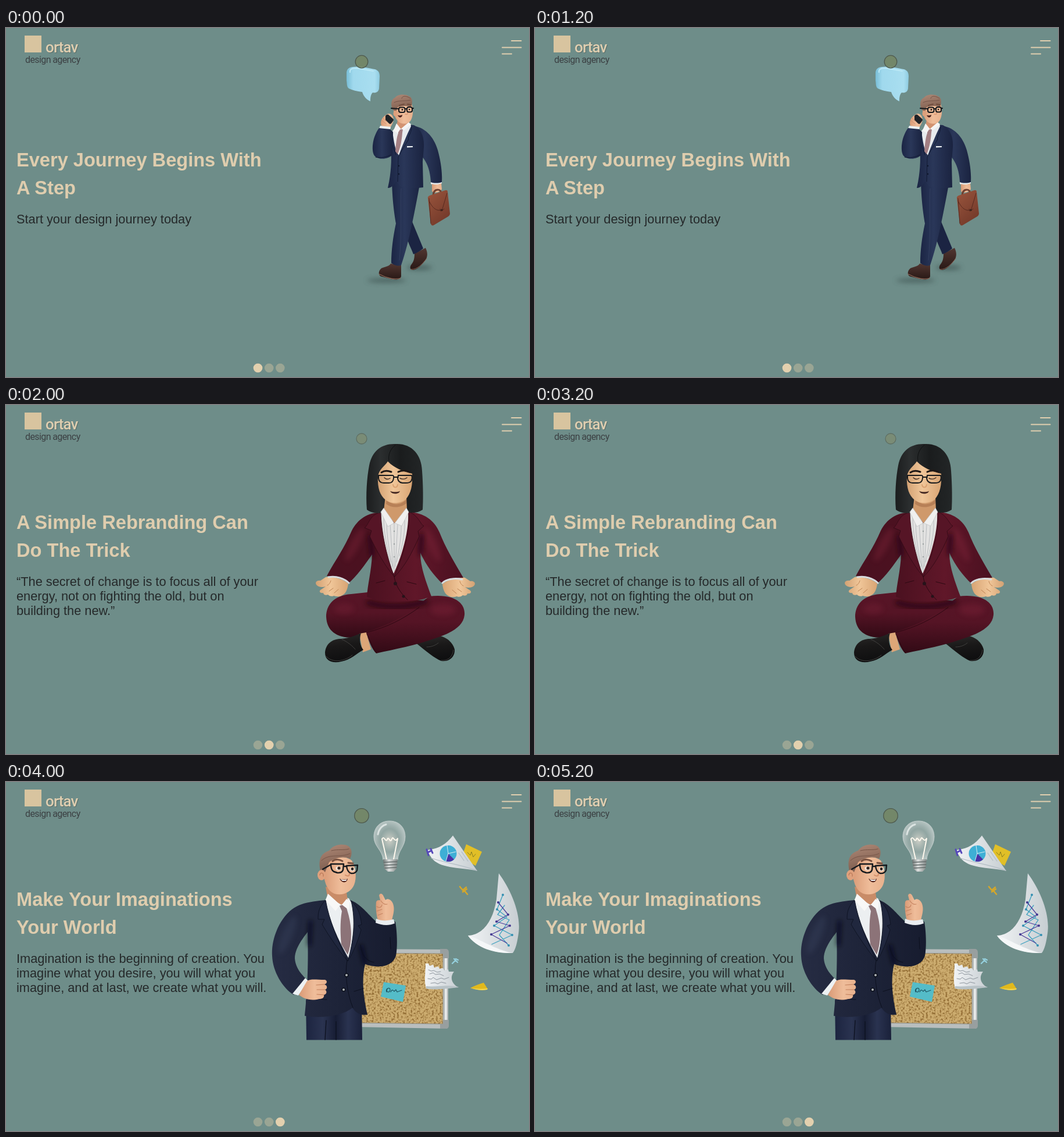
These frames come from a looping animation (900 by 600 pixels, 6000 ms). An HTML page:

```html
<!DOCTYPE html>
<html lang="en">
<head>
<meta charset="utf-8">
<title>Design agency slider</title>
<style>
html, body { margin: 0; width: 100%; height: 100%; overflow: hidden; background: #6e8d89; }
svg { display: block; width: 900px; height: 600px; }
.slide { animation: show 6s step-end infinite; }
.two { animation-delay: -4s; }
.three { animation-delay: -2s; }
@keyframes show {
  0% { visibility: visible; }
  33.333%, 100% { visibility: hidden; }
}
.h { font: bold 32.6px "Liberation Sans", Arial, sans-serif; fill: #dfcdae; }
.p { font: 21.75px "Liberation Sans", Arial, sans-serif; fill: #25292a; }
.brand { font: 500 26px Roboto, sans-serif; letter-spacing: -.9px; fill: #dfceb0; }
.tag { font: 16px Roboto, sans-serif; letter-spacing: -.6px; fill: #3c4144; }
.on { fill: #e3d0ae; }
.line { fill: none; stroke-linecap: round; stroke-linejoin: round; }
.soft { filter: url(#blur); }
.cursor { fill: #75865f; fill-opacity: .75; stroke: #4f5a4e; stroke-width: 1.3px; }
</style>
</head>
<body>
<svg viewBox="0 0 900 600">
<defs>
  <filter id="blur" x="-50%" y="-50%" width="200%" height="200%"><feGaussianBlur stdDeviation="4"/></filter>
  <filter id="cork" x="0" y="0" width="100%" height="100%" color-interpolation-filters="sRGB">
    <feTurbulence type="fractalNoise" baseFrequency=".3" numOctaves="2" seed="4"/>
    <feColorMatrix values="0 0 0 0 .55  0 0 0 0 .4  0 0 0 0 .18  3 0 0 0 -1.35"/>
    <feComposite in2="SourceGraphic" operator="in" result="n"/>
    <feMerge><feMergeNode in="SourceGraphic"/><feMergeNode in="n"/></feMerge>
  </filter>
  <linearGradient id="navy"><stop stop-color="#1b2544"/><stop offset=".45" stop-color="#2a3759"/><stop offset="1" stop-color="#1a2340"/></linearGradient>
  <linearGradient id="ink"><stop stop-color="#262c43"/><stop offset=".55" stop-color="#1d2338"/><stop offset="1" stop-color="#171c2f"/></linearGradient>
  <linearGradient id="legs"><stop stop-color="#1c2440"/><stop offset=".3" stop-color="#2a3350"/><stop offset=".53" stop-color="#171d34"/><stop offset=".75" stop-color="#2a3350"/><stop offset="1" stop-color="#1a213a"/></linearGradient>
  <linearGradient id="wine"><stop stop-color="#4a1120"/><stop offset=".3" stop-color="#4b1120"/><stop offset=".65" stop-color="#601729"/><stop offset="1" stop-color="#4a1020"/></linearGradient>
  <linearGradient id="thigh" x2="0" y2="1"><stop stop-color="#581527"/><stop offset=".45" stop-color="#551425"/><stop offset="1" stop-color="#310a15"/></linearGradient>
  <linearGradient id="skin"><stop stop-color="#d99a76"/><stop offset=".55" stop-color="#efbd9a"/><stop offset="1" stop-color="#e8b18d"/></linearGradient>
  <linearGradient id="tan"><stop stop-color="#d3a274"/><stop offset=".45" stop-color="#f0c699"/><stop offset="1" stop-color="#d8a473"/></linearGradient>
  <linearGradient id="hair" x2=".3" y2="1"><stop stop-color="#b08a78"/><stop offset="1" stop-color="#7c5c4d"/></linearGradient>
  <linearGradient id="bob"><stop stop-color="#1b1d1e"/><stop offset=".25" stop-color="#2b2e2f"/><stop offset=".6" stop-color="#1a1c1d"/><stop offset="1" stop-color="#232627"/></linearGradient>
  <linearGradient id="bubble"><stop stop-color="#78bdd6"/><stop offset=".2" stop-color="#a0d9ed"/><stop offset=".85" stop-color="#a9def0"/><stop offset="1" stop-color="#8ecbe0"/></linearGradient>
  <linearGradient id="leather" x2=".6" y2="1"><stop stop-color="#9a553d"/><stop offset="1" stop-color="#743a2a"/></linearGradient>
  <linearGradient id="shoe" x2="0" y2="1"><stop stop-color="#513631"/><stop offset="1" stop-color="#281815"/></linearGradient>
  <linearGradient id="boot" x2=".2" y2="1"><stop stop-color="#2c2b2a"/><stop offset=".5" stop-color="#191818"/><stop offset="1" stop-color="#0f0f10"/></linearGradient>
  <linearGradient id="paper"><stop stop-color="#f1f3f5"/><stop offset="1" stop-color="#c7ced2"/></linearGradient>
  <linearGradient id="metal"><stop stop-color="#6f7675"/><stop offset=".4" stop-color="#dde0df"/><stop offset="1" stop-color="#7d8483"/></linearGradient>
  <radialGradient id="glass"><stop stop-color="#efe6dc" stop-opacity=".75"/><stop offset=".6" stop-color="#b4bfbc" stop-opacity=".5"/><stop offset="1" stop-color="#d3dad9" stop-opacity=".7"/></radialGradient>
  <path id="hand" d="M550 296C560 294 580 299 589 307C588 316 585 325 577 328C571 331 566 328 564 328C560 330 556 328 554 326C550 328 546 326 546 323C541 324 538 321 541 318L550 312C544 314 537 313 534 309C531 304 536 301 541 302Z"/>
</defs>

<rect width="900" height="600" fill="#6e8d89"/>

<rect x="32" y="13" width="29" height="29" fill="#d8c49f"/>
<text class="brand" x="69" y="43" style="fill:#566c68">ortav</text>
<text class="brand" x="68" y="42">ortav</text>
<text class="tag" x="33" y="60">design agency</text>
<path class="line" d="M870 22H886.500M854 33.500H886.500M854 44.500H870" stroke="#e0cfaf" stroke-width="2"/>
<g fill="#9aa594"><circle cx="433.500" cy="584.500" r="7.800"/><circle cx="452.700" cy="584.500" r="7.800"/><circle cx="471.800" cy="584.500" r="7.800"/></g>

<!-- Walking man -->
<g class="slide">
  <text class="h"><tspan x="18" y="238">Every Journey Begins With</tspan><tspan x="18" y="286">A Step</tspan></text>
  <text class="p" x="18" y="336">Start your design journey today</text>
  <circle class="on" cx="433.500" cy="584.500" r="7.800"/>

  <path d="M596 67C609 65 625 69 635 71C641 73 643 77 643 83L642 104C641 110 637 112 631 111C627 115 627 121 627 126C620 123 615 117 613 110C604 109 596 107 590 104C586 101 587 96 586 90V76C587 70 590 68 596 67Z" fill="url(#bubble)"/>
  <path class="line" d="M592 76C591 70 597 69 604 69L632 74" stroke="#bce9f6" stroke-width="2"/>

  <g class="soft" fill="#3f5552" opacity=".8"><ellipse cx="655" cy="434" rx="34" ry="3.500"/><ellipse cx="711" cy="412" rx="22" ry="4"/></g>
  <path d="M703 388L722 378C726 386 726 394 721 400C715 407 709 415 701 416C695 416 694 411 698 406C702 401 703 395 703 388Z" fill="url(#shoe)"/>
  <path class="line" d="M697 415C707 416 717 406 724 396" stroke="#8b6556" stroke-width="1"/>
  <path d="M693 325L699 333L718 379C713 383 707 387 701 389C698 380 692 370 690 360Z" fill="#1b2442"/>
  <path d="M662 405L680 408L680 427C678 434 668 433 661 431L645 427C640 424 641 417 646 413C653 410 659 410 662 405Z" fill="url(#shoe)"/>
  <path class="line" d="M642 423C653 429 669 434 679 430" stroke="#8b6556" stroke-width="1.300"/>
  <path d="M664 255C664 290 668 319 671 336C666 359 663 383 663 404C668 408 675 410 680 408C691 376 699 340 714 258Z" fill="url(#navy)"/>
  <path class="line" d="M680 276C678 309 682 343 677 399" stroke="#3b4868" opacity=".6"/>

  <path d="M731 263H750V267C745 271 736 271 731 268Z" fill="#e5ecef"/>
  <path d="M733 268C738 270 745 269 749 267L750 277C747 282 738 285 733 281Z" fill="url(#skin)"/>
  <path class="line" d="M735 290C735 281 738 278 743 278C747 278 749 281 749 285" stroke="#71402f" stroke-width="3"/>
  <path d="M726 293Q725 290 729 288L756 279Q760 278 760 282L764 319Q764 322 761 324L736 339Q732 341 731 336Z" fill="url(#leather)"/>
  <path class="line" d="M728 297C736 316 748 315 751 311L759 284M731 336L728 293M747 311L748 315L754 311" stroke="#57291f"/>
  <circle cx="750" cy="313" r="1.800" fill="#37221b"/>

  <path d="M697 168C720 169 736 186 743 210C748 228 751 248 750 265C744 267 736 267 731 265C730 247 726 233 716 221Z" fill="url(#navy)"/>
  <path d="M664 178L683 165L702 167C714 173 720 187 719 205L717 230L718 274C703 276 689 276 678 272L671 263C668 269 664 275 657 275C663 250 664 222 662 205Z" fill="url(#navy)"/>
  <path d="M665 177L675 165L696 164L697 169C690 183 682 202 676 219C670 211 667 194 665 177Z" fill="#e8ebee"/>
  <path d="M674 175L683 174L682 180C681 195 678 208 674 217L670 212C671 201 672 188 675 181Z" fill="#a37f83"/>
  <path class="line" d="M698 168C699 180 690 188 693 191C688 200 679 213 675 222L674 264M665 180L660 188L671 218" stroke="#111a33"/>
  <path d="M690 203L700 203V205L690 205.500Z" fill="#e9edf0"/>
  <path d="M674 158L694 157V164L681 174L672 169Z" fill="#d29270"/>
  <path d="M672 164L679 173L674 181L667 176ZM693 162L697 166L685 176L680 173Z" fill="#f5f5f5"/>

  <path d="M666 134C672 124 688 121 698 130C701 139 701 150 697 158C693 165 685 166 678 163C670 158 667 148 666 134Z" fill="url(#skin)"/>
  <path d="M665 140C661 129 664 122 669 120C674 114 686 113 693 117C700 119 700 128 697 136C689 133 680 134 674 136L671 144Z" fill="url(#hair)"/>
  <path class="line" d="M681 121C682 116 689 116 696 121M668 128C675 124 688 126 696 124" stroke="#735449" stroke-width="1"/>
  <ellipse cx="670" cy="147" rx="3.500" ry="5" fill="#dda07c"/>
  <path d="M674 150C678 151 681 150 682 149C682 155 676 155 674 150Z" fill="#4a211d"/>
  <path class="line" d="M689 141C693 147 691 150 687 148" stroke="#d99672" stroke-width="1.500"/>
  <path class="line" d="M677 133L685 131M691 131L697 132" stroke="#714d3d" stroke-width="2"/>
  <g class="line" stroke="#13171b" stroke-width="2"><rect x="676" y="136.500" width="10.500" height="8.500" rx="3"/><rect x="690" y="136" width="9" height="8.500" rx="3"/><path d="M663 138L676 139M687 139H690M699 138H701"/></g>
  <circle cx="682" cy="140.500" r="1.400" fill="#241c1a"/><circle cx="694" cy="140" r="1.300" fill="#241c1a"/>

  <path d="M646 168C643 160 648 152 656 148C662 145 667 151 667 158C666 165 662 168 661 173Z" fill="url(#skin)"/>
  <path d="M653 151Q655 148 658 149L666 156Q668 158 666 160L663 164Q661 166 659 164L653 158Z" fill="#202328"/>
  <path class="line" d="M649 155L654 160M647 159L654 165" stroke="#d18f6c" stroke-width="1"/>
  <path d="M644 168L662 170L661 175L642 173Z" fill="#edf2f4"/>
  <path d="M642 172L661 174L666 179L665 218C658 226 639 228 633 218C628 207 632 185 642 172Z" fill="url(#navy)"/>
  <path class="line" d="M636 222C646 224 655 222 662 218" stroke="#111a33"/>
  <circle cx="676" cy="237" r="1.200" fill="#10172c"/><circle cx="676" cy="251" r="1.200" fill="#10172c"/>
  <circle class="cursor" cx="612" cy="58" r="10.800"/>
</g>

<!-- Meditating woman -->
<g class="slide two">
  <text class="h"><tspan x="18" y="213">A Simple Rebranding Can</tspan><tspan x="18" y="261">Do The Trick</tspan></text>
  <text class="p"><tspan x="18" y="311">“The secret of change is to focus all of your</tspan><tspan x="18" y="336">energy, not on fighting the old, but on</tspan><tspan x="18" y="361">building the new.”</tspan></text>
  <circle class="on" cx="452.700" cy="584.500" r="7.800"/>

  <path d="M704 408L741 396C758 398 769 408 772 420C773 433 763 442 749 440C737 435 725 425 704 408Z" fill="url(#boot)"/>
  <path class="line" d="M749 439C759 440 768 435 770 421M724 416C731 416 738 414 744 409" stroke="#41413f"/>
  <path d="M594 325C564 327 551 344 551 364C552 388 568 400 596 400L635 392L740 340L622 322Z" fill="url(#thigh)"/>
  <path d="M608 393L620 391L628 420L614 425Z" fill="#dca678"/>
  <path d="M611 392C607 404 610 415 615 421C603 427 594 438 577 441C562 445 549 440 549 426C550 411 561 402 576 402C590 401 600 397 611 392Z" fill="url(#boot)"/>
  <path class="line" d="M551 432C562 445 584 440 596 430M578 403C588 407 597 415 601 420" stroke="#42413f"/>
  <path d="M728 329C767 324 791 338 789 361C787 382 763 393 739 401C705 413 669 420 637 427C630 420 623 404 620 390C648 382 676 369 697 354Z" fill="url(#thigh)"/>
  <path class="line" d="M621 391C656 382 682 369 711 348M621 394C627 403 630 417 638 426" stroke="#2b0811" opacity=".9"/>
  <ellipse class="soft" cx="752" cy="352" rx="22" ry="10" fill="#7d2439" opacity=".4"/>
  <ellipse class="soft" cx="582" cy="350" rx="17" ry="9" fill="#792137" opacity=".35"/>
  <path class="line soft" d="M624 340C655 349 690 349 722 338" stroke="#1f060e" stroke-width="8" opacity=".8"/>

  <use href="#hand" fill="url(#tan)"/>
  <use href="#hand" fill="url(#tan)" transform="matrix(-1 0 0 1 1340 1)"/>
  <path class="line" d="M556 320L563 315M565 323L572 317M553 310C557 308 558 305 559 302M784 321L777 316M775 324L768 318M787 311C783 309 782 306 781 303" stroke="#bd8354" stroke-width="1"/>
  <path d="M647 184C621 185 605 197 595 216C582 247 565 269 552 294C567 295 583 299 589 307C603 295 618 274 630 257C629 284 622 310 621 330C647 340 705 341 732 329C723 304 713 279 713 254C723 276 737 294 751 307C759 299 774 297 787 297C772 271 757 247 746 219C737 198 719 185 693 184Z" fill="url(#wine)"/>
  <path class="line" d="M555 296C568 293 583 299 590 306M751 306C758 299 773 297 785 300" stroke="#d8dcdd" stroke-width="3"/>
  <ellipse class="soft" cx="600" cy="240" rx="8" ry="32" fill="#8b2940" opacity=".3" transform="rotate(28 600 240)"/>
  <ellipse class="soft" cx="734" cy="241" rx="8" ry="31" fill="#8b2940" opacity=".3" transform="rotate(-24 734 241)"/>
  <path class="line soft" d="M630 258L627 226M713 255L715 224" stroke="#240812" stroke-width="6"/>

  <path d="M645 185L667 204L692 183C694 211 684 254 667 290C653 260 643 216 645 185Z" fill="#e3e3e2"/>
  <path class="line" d="M650 192C650 219 655 245 662 270M655 197C655 224 659 250 665 278M661 204L666 281M674 205L670 278M680 199C681 223 677 248 672 270M686 193C687 216 683 240 677 260" stroke="#aeb2b5" stroke-width=".8"/>
  <path class="line" d="M668 204V286" stroke="#b8bbbc"/>
  <g fill="#999f9f"><circle cx="668" cy="217" r="1.200"/><circle cx="668" cy="239" r="1.200"/><circle cx="668" cy="261" r="1.200"/></g>
  <path d="M645 185C626 187 624 207 617 211L629 216L626 226C639 253 651 275 668 295C654 256 646 219 645 185ZM693 184C709 188 714 207 719 208L709 217L711 226C699 254 686 278 668 296C685 256 695 218 693 184Z" fill="#561526" stroke="#300a15" stroke-width=".8"/>
  <path class="line" d="M668 295C670 309 677 321 691 335M637 306L652 302M690 304L706 308" stroke="#2b0912"/>
  <circle cx="670" cy="307" r="3" fill="#26131a"/><circle cx="684" cy="329" r="2.500" fill="#26131a"/>

  <path d="M671 67C698 66 715 85 716 113C718 140 718 165 717 180C707 187 694 186 688 182L654 183C643 188 629 186 621 180C619 154 621 125 625 104C630 79 646 66 671 67Z" fill="url(#bob)"/>
  <path d="M653 156H689L690 181L669 203L650 182Z" fill="#cf996b"/>
  <path d="M655 163C664 173 680 173 689 162V169C680 177 664 178 654 170Z" fill="#a8714a" opacity=".6"/>
  <path d="M650 177L668 203L657 209L645 184ZM689 177L669 203L681 208L693 184Z" fill="#f0f0ef" stroke="#bfc2c2" stroke-width=".7"/>
  <path d="M657 97C651 106 642 110 640 123C639 143 644 156 653 163C663 171 679 170 688 162C697 152 700 138 699 118C683 114 669 109 657 97Z" fill="url(#tan)"/>
  <path class="line" d="M659 96C657 85 662 75 670 69" stroke="#0e1011"/>
  <path class="line" d="M646 116C652 112 658 113 663 115M675 115C681 112 688 112 694 115" stroke="#1d1715" stroke-width="3"/>
  <path class="line" d="M651 125C654 128 658 128 661 126M678 126C682 128 686 128 690 125" stroke="#392820" stroke-width="1.400"/>
  <g class="line" stroke="#181a1c" stroke-width="2"><path d="M641 121H665Q668 121 667 126Q666 134 659 134H650Q642 134 641 126ZM675 121H698Q700 126 697 131Q695 134 688 134H682Q675 133 674 126ZM667 124H675"/></g>
  <path class="line" d="M666 137C667 143 673 143 674 137" stroke="#daa272" stroke-width="2"/>
  <path d="M661 148C667 150 673 150 678 148C676 154 664 154 661 148Z" fill="#40241f"/>
  <circle class="cursor" cx="612" cy="58" r="9" style="fill:#7f8c70;stroke:#5f6f63"/>
</g>

<!-- Man with ideas -->
<g class="slide three">
  <text class="h"><tspan x="18" y="213">Make Your Imaginations</tspan><tspan x="18" y="261">Your World</tspan></text>
  <text class="p"><tspan x="18" y="311">Imagination is the beginning of creation. You</tspan><tspan x="18" y="336">imagine what you desire, you will what you</tspan><tspan x="18" y="361">imagine, and at last, we create what you will.</tspan></text>
  <circle class="on" cx="471.800" cy="584.500" r="7.800"/>

  <path d="M600 287L757 288Q761 288 761 292V420Q761 424 757 424L600 421Z" fill="#b9bebe"/>
  <path d="M600 294L752 295V416L600 414Z" fill="#cdad70" filter="url(#cork)"/>
  <path class="line" d="M600 294L752 295V416L600 414" stroke="#8b897f"/>
  <path class="line" d="M757 303V408" stroke="#f0f2f1" stroke-width="3"/>
  <path d="M747 287H758Q762 288 762 293V303H753V295H747ZM753 409H762V420Q761 424 757 424H747V416H753Z" fill="#989f9f"/>
  <path d="M650 344L688 350L683 378L645 369Z" fill="#54bcc8"/>
  <path class="line" d="M655 361C652 355 661 352 661 357C661 363 653 362 656 356M662 361C665 354 667 360 668 360L671 357L673 361L681 358" stroke="#1f5663" stroke-width="1.200"/>

  <path d="M722 312L727 312L729 316L735 314L737 319L744 317L746 321L752 320L754 324L761 322L762 326L771 326C762 337 769 349 779 353C760 352 744 359 723 355C719 342 722 327 722 312Z" fill="url(#paper)"/>
  <path class="line" d="M727 323l5 2 4-1 6 3 6-1M729 330l6-2 4 3 7-1 7 3M726 338l6 1 3-3 6 4 8-3 5 2 8-3M731 346l7-1 5 2 6-3 8 2" stroke="#8c949c" stroke-width="1"/>
  <path d="M723 351C744 353 761 347 779 353C760 355 744 358 723 355Z" fill="#b9c3c7"/>
  <path d="M799 354C807 350 815 347 822 345L829 356C819 360 809 357 799 354Z" fill="#e1b91d"/>
  <path d="M799 354C809 356 819 356 829 355L828 357C818 359 809 357 799 354Z" fill="#f4d957"/>
  <path class="line" d="M768 312L773 307M771 304L777 310M774 304L778 306" stroke="#94cfdd" stroke-width="2.400"/>

  <path d="M792 107L819 120L808 144L784 130Z" fill="#e1bf27"/>
  <path class="line" d="M794 121l5 5 2-6 3 9 4-5" stroke="#8c8122" stroke-width="1"/>
  <path d="M769 92L811 153C788 146 747 151 732 130C729 125 726 121 723 117C742 116 757 108 769 92Z" fill="url(#paper)"/>
  <ellipse cx="761" cy="123" rx="14.500" ry="14" fill="#3eafd5"/>
  <path d="M761 123L771 133C767 137 762 138 757 136Z" fill="#4833a7"/>
  <path class="line" d="M761 123L759 109M761 123L774 120M761 123L757 136" stroke="#d7edf3"/>
  <path class="line" d="M732 131C755 139 780 141 810 152M779 122l9 13M784 120l11 16" stroke="#b2bdc4" stroke-width="1.300"/>
  <path class="line" d="M724 116L727 126M726 121L732 118M731 115L734 122" stroke="#5548b9" stroke-width="3"/>
  <path class="line" d="M781 180L786 186L792 181M786 189L793 184M789 187L794 193" stroke="#d4a72a" stroke-width="2.600"/>

  <path d="M848 157C868 184 887 226 882 260C880 275 877 288 872 294C844 295 810 285 795 264C820 263 838 240 844 202Z" fill="url(#paper)"/>
  <path d="M795 264C814 269 843 289 872 294C843 295 811 287 795 264Z" fill="#f5f7f8"/>
  <path class="line" d="M855 194L845 219L862 232L840 247L871 263L836 279M858 212L846 228L866 237L849 263L865 281" stroke="#3a9fbe" stroke-width="1.300"/>
  <path class="line" d="M847 207L864 228L844 240L867 247L835 262L862 277" stroke="#4b3d9b" stroke-width="1.300"/>
  <g fill="#41368f"><circle cx="847" cy="207" r="2"/><circle cx="864" cy="228" r="2"/><circle cx="844" cy="240" r="2"/><circle cx="867" cy="247" r="2"/><circle cx="835" cy="262" r="2"/></g>
  <g fill="#348fb0"><circle cx="855" cy="194" r="2"/><circle cx="845" cy="219" r="2"/><circle cx="840" cy="247" r="2"/><circle cx="871" cy="263" r="2"/><circle cx="865" cy="281" r="2"/></g>

  <path d="M660 67C677 67 687 79 687 94C687 111 675 117 674 134H649C648 117 633 111 633 94C633 79 643 67 660 67Z" fill="url(#glass)" stroke="#cbd4d2" stroke-width=".8"/>
  <path class="line" d="M655 133L647 98C651 91 653 105 656 99C658 91 661 107 664 98C666 91 669 106 674 97L667 133" stroke="#fff9ee" stroke-width="2"/>
  <path class="line" d="M640 90C642 79 649 74 654 73" stroke="#f2f6f5" stroke-width="3" opacity=".7"/>
  <path d="M649 133H674L672 149L667 154H657L651 149Z" fill="url(#metal)"/>
  <path class="line" d="M650 138L673 137M651 143L673 142M652 148L672 147" stroke="#626b6a" stroke-width="1.300"/>

  <path d="M516 375L612 375L613 443.500H517Z" fill="url(#legs)"/>
  <path class="line" d="M568 412V443M551 410L549 443" stroke="#0d111f" stroke-width="1.300"/>
  <path d="M550 203L590 202C611 209 623 228 636 239L670 240C673 257 674 283 671 299C665 317 642 322 618 313C611 341 616 374 622 400C610 402 602 397 596 388C580 402 544 407 514 402C517 374 521 326 519 258C507 273 497 289 497 303C498 318 507 330 517 339C509 349 502 359 495 366C476 354 459 326 458 299C456 272 469 237 492 219C507 207 530 205 550 203Z" fill="url(#ink)"/>
  <ellipse class="soft" cx="484" cy="263" rx="9" ry="35" fill="#39425d" opacity=".4" transform="rotate(23 484 263)"/>
  <path class="line soft" d="M522 280L524 240M618 312L611 282" stroke="#090c17" stroke-width="5"/>
  <path class="line" d="M610 280C612 295 617 307 633 310M522 374C534 369 542 375 552 374M599 360L615 355M661 267l1 20" stroke="#0c101e"/>
  <path d="M493 364L515 337L520 342L503 367Z" fill="#edf1f3"/>
  <path d="M504 366L518 342C525 338 533 340 549 340C554 342 552 347 548 348C554 350 553 356 549 357C553 360 552 365 547 366C548 370 545 373 539 373C524 377 513 373 504 366Z" fill="url(#skin)"/>
  <path class="line" d="M548 348L534 349M549 357L535 357M547 366L535 365" stroke="#c07f5d" stroke-width="1.200"/>
  <path d="M550 202L557 190L590 200L600 216C601 246 596 276 590 304C573 274 555 237 550 202Z" fill="#eceff1"/>
  <path d="M574 213L584 209L587 220C595 245 597 272 588 297L577 279C575 260 575 239 578 222Z" fill="#8c7378"/>
  <path d="M550 203C538 215 537 225 537 236L548 236L544 245C557 267 572 288 587 307C571 272 556 238 550 203ZM594 205C607 216 610 230 612 245L606 247L611 254C605 276 597 294 588 308C598 273 602 239 594 205Z" fill="#20273e" stroke="#0c111f" stroke-width=".8"/>
  <path class="line" d="M587 307C583 326 586 362 597 388" stroke="#0c101e"/>
  <g fill="#aeb3b6" stroke="#0b0f1a" stroke-width="1.500"><circle cx="586" cy="332" r="2.800"/><circle cx="581" cy="357" r="2.800"/></g>

  <path d="M550 180L586 189L588 204L577 211L553 197Z" fill="#c98c68"/>
  <path d="M554 192L575 211L567 222L550 203ZM586 201L592 205L590 220L578 211Z" fill="#f8f8f7"/>
  <path d="M545 143C556 128 581 124 595 135C602 147 604 164 599 177C593 190 579 196 565 192C552 186 547 174 545 143Z" fill="url(#skin)"/>
  <path d="M541 153C537 134 541 123 556 118C563 108 578 105 589 110C596 115 596 124 592 132C582 127 566 130 556 138L549 155Z" fill="url(#hair)"/>
  <path class="line" d="M543 135C557 122 575 131 592 123M560 118C572 115 581 118 590 115" stroke="#755548" stroke-width="1"/>
  <ellipse cx="543" cy="160" rx="7" ry="9" fill="#dfa17d"/>
  <path class="line" d="M540 160C541 154 547 156 546 162" stroke="#ba7858" stroke-width="1.300"/>
  <path class="line" d="M562 136C567 132 574 133 579 136M589 139L597 140" stroke="#76503f" stroke-width="3"/>
  <path d="M574 166C579 168 585 168 588 166C587 174 578 175 574 166Z" fill="#54261f"/>
  <path d="M575.500 167C580 168.500 585 168.500 587 167L585 170H579Z" fill="#fff"/>
  <path class="line" d="M588 151C594 160 590 164 584 160" stroke="#d38f6b" stroke-width="2"/>
  <g fill="#f3e6da"><ellipse cx="572" cy="148.500" rx="4.500" ry="3.500"/><ellipse cx="596" cy="150" rx="4" ry="3.500"/></g>
  <circle cx="573" cy="148" r="2.600" fill="#2d211d"/><circle cx="596" cy="149.500" r="2.400" fill="#2d211d"/>
  <path class="line" d="M545 150L559 142M559 141L581 141L580 151Q578 157 570 156L564 154Q559 151 559 141M586 144L605 143L604 152Q601 158 594 157Q587 155 586 144M581 145H586" stroke="#15191d" stroke-width="2.400"/>

  <path d="M640 238C637 229 636 214 637 206C639 202 642 204 644 203L642 195C643 191 647 191 649 195L653 203C658 198 666 205 667 213C669 222 665 231 664 239Z" fill="url(#skin)"/>
  <path class="line" d="M645 204C648 209 652 211 656 210M638 214C643 218 647 214 647 211M638 222L647 219M640 229L648 226" stroke="#c68562" stroke-width="1.200"/>
  <path d="M637 235C648 240 658 238 667 236L669 243C658 248 645 246 636 242Z" fill="#e9edf0"/>
  <circle class="cursor" cx="612" cy="58" r="12.300"/>
</g>
</svg>
</body>
</html>
```
